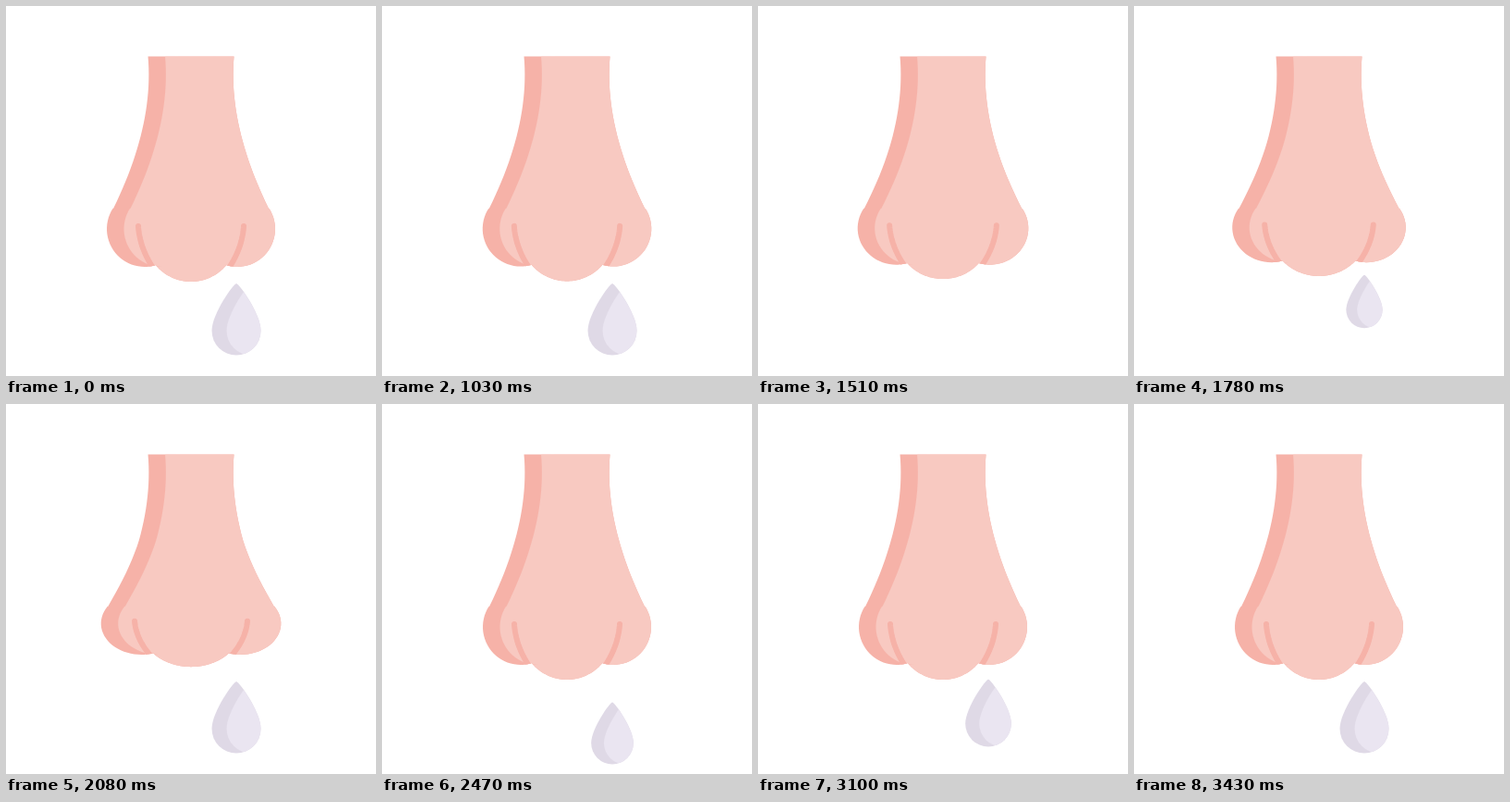
Animation of 400x400 px, one loop 3460 ms. Source, as an HTML page:

```html
<!DOCTYPE html>
<html lang="en">
<head>
<meta charset="utf-8">
<title>Runny nose</title>
<style>
  html, body { margin: 0; height: 100%; overflow: hidden; background: #fff; }
  svg { display: block; width: 100%; height: 100%; }
</style>
</head>
<body>
<svg viewBox="0 0 400 400">
  <defs>
    <path id="tear" d="M0 -39 C3 -39 26.5 -6 26.5 12 A26.5 26.5 0 0 1 -26.5 12 C-26.5 -6 -3 -39 0 -39 Z"/>
    <clipPath id="tearClip"><use href="#tear"/></clipPath>
    <clipPath id="noseClip"><path id="outline"/></clipPath>
  </defs>
  <g id="drop">
    <use href="#tear" fill="#dfd9e6"/>
    <g clip-path="url(#tearClip)"><use href="#tear" x="16" fill="#eae5f1"/></g>
  </g>
  <g clip-path="url(#noseClip)">
    <rect width="400" height="400" fill="#f6b2a8"/>
    <path id="light" fill="#f8c9c1"/>
    <path id="grooves" fill="none" stroke="#f6b2a8" stroke-width="6" stroke-linecap="round"/>
  </g>
</svg>
<script>
const LOOP = 3460, HOLD = 1030, STEP = 30;
const SNIFF = 580, SNIFFS = [1000, 1675];
const FALL = 310, GROW = 580, FALLS = [1185, 2355];
const SHADE = 18.5;

const $ = id => document.getElementById(id);
const clamp = v => Math.min(1, Math.max(0, v));
const sample = (n, fn) => Array.from({ length: n + 1 }, (_, i) => fn(i / n));

const arc = (cx, cy, r, from, to) => sample(24, u => {
  const a = (from + (to - from) * u) * Math.PI / 180;
  return [cx + r * Math.cos(a), cy + r * Math.sin(a)];
});
const bezier = (a, b, c, d) => sample(24, u => a.map((_, k) =>
  (1 - u) ** 3 * a[k] + 3 * u * (1 - u) ** 2 * b[k] + 3 * u * u * (1 - u) * c[k] + u ** 3 * d[k]));

// Left half of the relaxed nose: neck and round wing, then the tip
const side = [
  ...bezier([153.5, 54.5], [158, 105], [145, 160], [116, 219]),
  ...arc(150, 241, 41, 213, 90)
];
const under = [...arc(150, 241, 41, 90, 73), ...arc(200, 248, 50, 139.5, 90)];
const groove = bezier([143, 238], [144, 254], [150, 270], [159, 283]);

// A sniff spreads the lower nose sideways and lifts its underside
const warp = (pts, p) => pts.map(([x, y]) => [
  x + (x - 200) * 0.07 * p * clamp((y - 150) / 65),
  y - 14 * p * Math.max(0, (y - 220) / 78)
]);
const mirror = pts => pts.map(([x, y]) => [400 - x, y]);
const line = pts => "M" + pts.map(pt => pt.map(v => v.toFixed(2))).join("L");

function drawNose(p) {
  const flank = warp(side, p);
  const left = [...flank, ...warp(under, p)];
  const fold = warp(groove, p);
  $("outline").setAttribute("d", line([...left, ...mirror(left).reverse()]) + "Z");
  $("light").setAttribute("d", line(flank.map(([x, y]) => [x + SHADE, y])) + "H158V400H400V54Z");
  $("grooves").setAttribute("d", line(fold) + line(mirror(fold)));
}

function drawDrop(t) {
  let y = 339, size = 1;
  const start = FALLS.filter(s => t >= s).pop();
  if (start !== undefined) {
    const age = t - start;
    if (age < FALL) {
      const q = (age / FALL) ** 2;
      y += 125 * q;
      size = 1 - q;
    } else {
      size = 1 - (1 - clamp((age - FALL) / GROW)) ** 2;
      y = 264 + 75 * size;
    }
  }
  $("drop").setAttribute("transform", `translate(249 ${y}) scale(${size})`);
}

function render(now) {
  const raw = now % LOOP;
  const t = raw < HOLD ? 0 : HOLD + Math.floor((raw - HOLD) / STEP) * STEP;
  const flare = SNIFFS.reduce((sum, s) => sum + Math.sin(Math.PI * clamp((t - s) / SNIFF)) ** 2, 0);
  drawNose(1.5 * flare);
  drawDrop(t);
}

const begin = performance.now();
function tick() {
  render(performance.now() - begin);
  requestAnimationFrame(tick);
}
tick();
</script>
</body>
</html>
```
